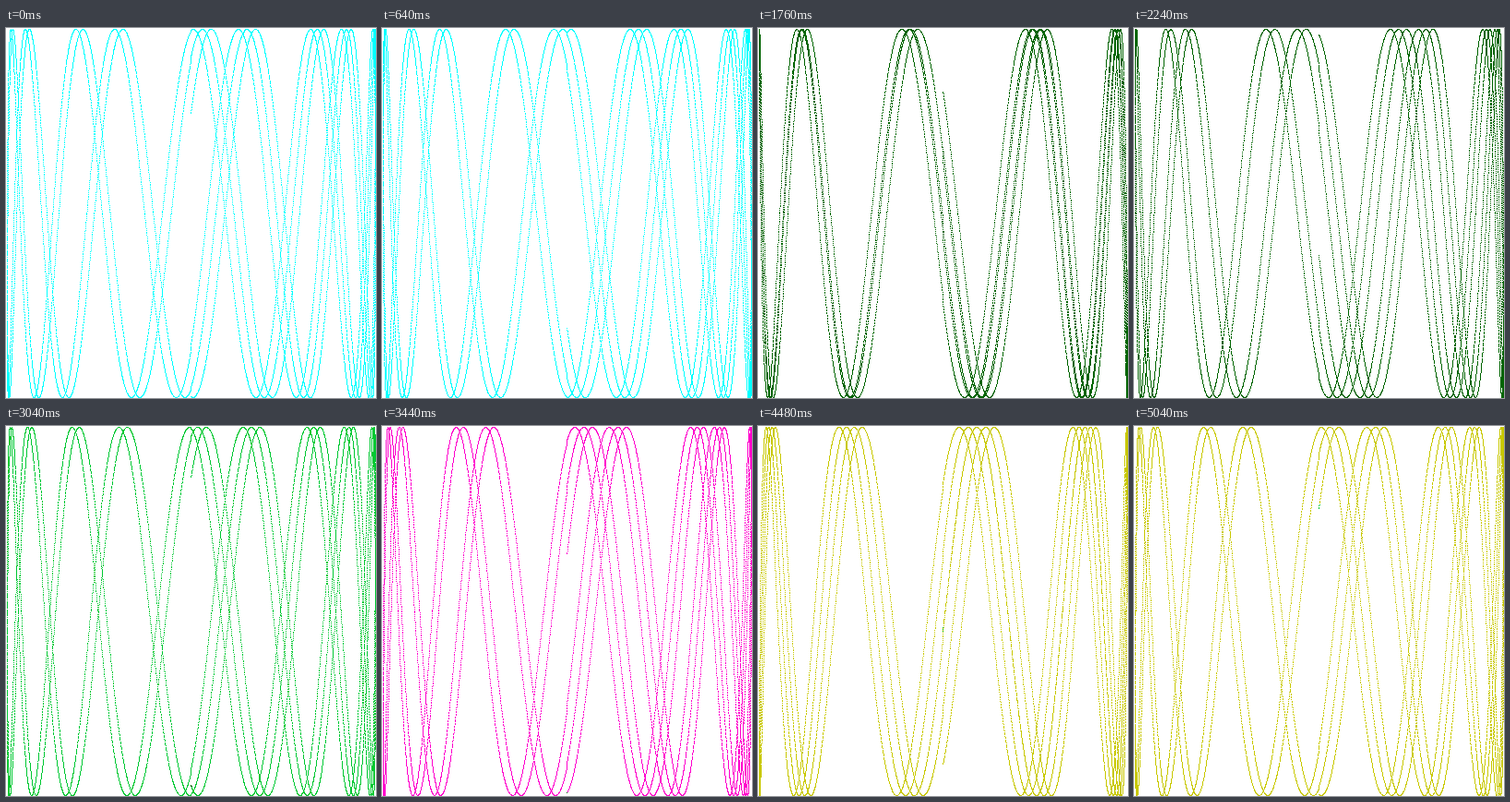
Animation, 401 px wide and 401 px high, one loop 5.12 s. Source, as an HTML page with a canvas:

```html
<!DOCTYPE html>
<html>
<head>
<meta charset="utf-8">
<style>
html, body { margin: 0; width: 100%; height: 100%; overflow: hidden; background: #fff; }
canvas { display: block; width: 401px; height: 401px; }
</style>
</head>
<body>
<canvas id="stage" width="401" height="401"></canvas>
<script>
const SIZE = 200, SIDE = 2 * SIZE + 1;
const STEPS = 64, DELAY = 80;
const FREQ = 15 * 0.6046602879796196, PHASE = 10, PHASE_STEP = 0.1;
const RES = 0.001, END = 5 * Math.PI, HEAD = 4;

// [first step, colour]
const LINE = [[0, '#00ffff'], [22, '#006400'], [33, '#00c832'], [43, '#ff00cc'], [55, '#c8c800']];
const TIP = [[0, '#00ffff'], [12, '#006400'], [55, '#00c832']];

const ctx = document.getElementById('stage').getContext('2d');
const image = ctx.createImageData(SIDE, SIDE);
const pixels = new Uint32Array(image.data.buffer);

const pick = (table, step) => table.filter(row => row[0] <= step).pop()[1];

function pack(hex) {
  const n = parseInt(hex.slice(1), 16);
  return (0xff000000 | (n & 255) << 16 | (n & 0xff00) | n >> 16) >>> 0;
}

// Truncation toward zero keeps the curve inside 1..400.
const place = v => SIZE + Math.trunc(v * SIZE + 0.5);

function draw(step) {
  const phase = PHASE + step * PHASE_STEP;
  const line = pack(pick(LINE, step)), tip = pack(pick(TIP, step));
  const plot = (t, colour) => {
    pixels[place(Math.sin(t * FREQ + phase)) * SIDE + place(Math.sin(t))] = colour;
  };
  pixels.fill(0xffffffff);
  for (let k = 0; k * RES < END; k++) plot(k * RES, k < HEAD ? tip : line);
  ctx.putImageData(image, 0, 0);
}

const start = performance.now();
let shown = -1;

function tick() {
  const step = Math.floor((performance.now() - start) / DELAY) % STEPS;
  if (step !== shown) draw(shown = step);
  requestAnimationFrame(tick);
}
tick();
</script>
</body>
</html>
```
